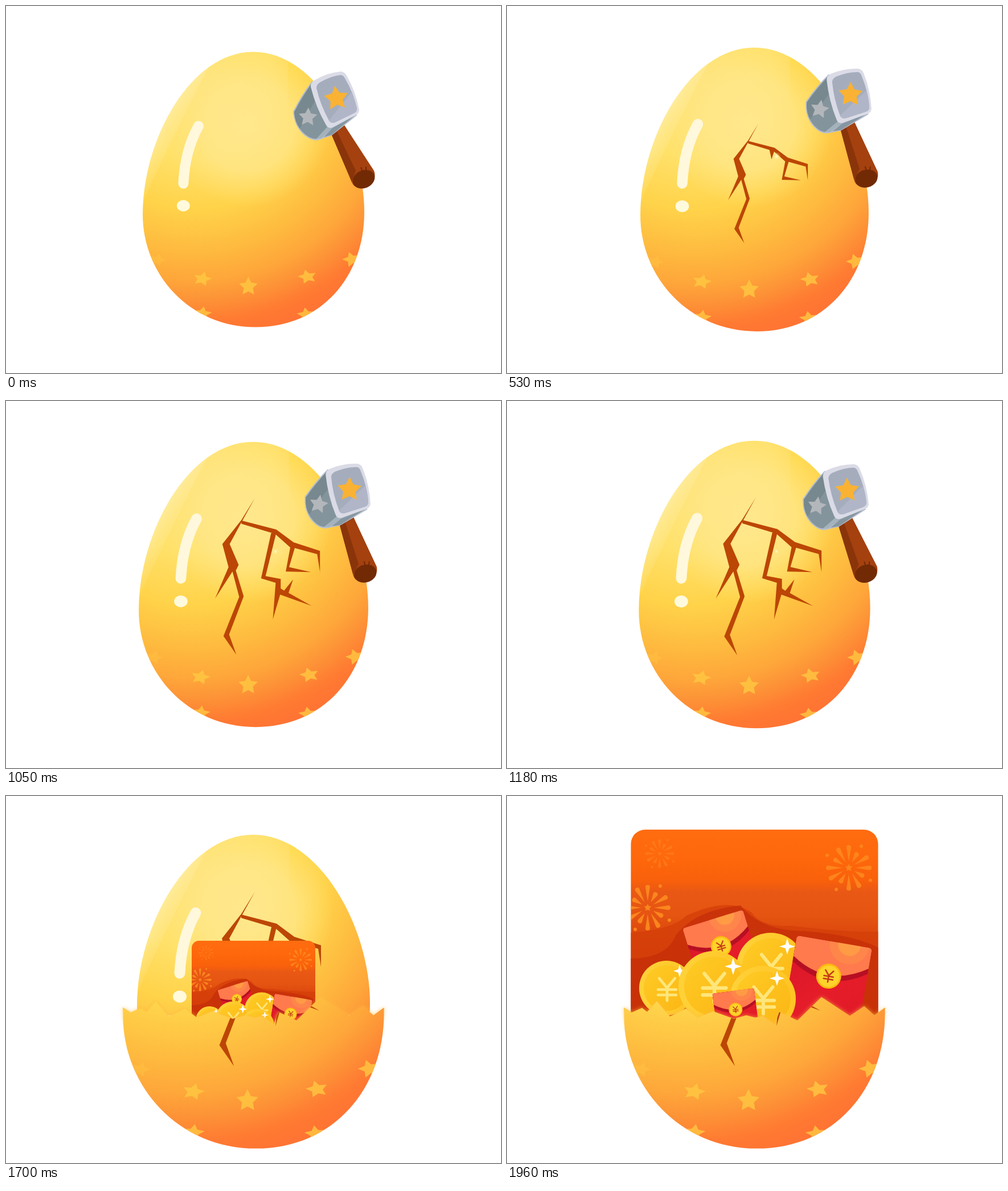
An HTML page with a canvas that plays this animation: 869x644 px, repeating every 2030 ms.

```html
<!DOCTYPE html>
<html lang="en">
<head>
<meta charset="utf-8">
<title>Golden egg</title>
<style>
html, body { margin: 0; width: 100%; height: 100%; overflow: hidden; background: #fff; }
canvas { display: block; }
</style>
</head>
<body>
<canvas id="stage" width="869" height="644"></canvas>
<script>
const ctx = document.getElementById('stage').getContext('2d');
const LOOP = 2030, MID = 434.5, TAU = Math.PI * 2;

// One entry per 130 ms step.
const hammerAngle = [0, -6, -15, -23, 8, 8, -15, -23, 8, 6, -15, -23, -23];
const eggScale = [.951, .953, .958, .971, .98, .98, .98, .982, .985, .993, 1];
const glowSize = [0, 0, 1, .6, .16, .16, .16, .6, .13, .1];

const eggPath = new Path2D('M434 68C318 68 230 230 230 368C230 480 318 576 438 576C560 576 639 482 639 364C639 230 550 68 434 68Z');
const crackPath = new Path2D(
  'M437 168L411 215L392 250L408 287L403 297L417 343L391 411L404 447L381 414L409 344L397 299L366 347L390 291L379 250L413 207Z' +
  'M413 208L475 224L506 247L553 262L553 300L548 268L508 257L498 291L537 300L492 299L500 256L473 232L413 214Z');
const forkPath = new Path2D('M466 230L448 311L474 319L469 384L482 340L538 360L497 337L505 313L489 333L483 329L483 312L456 307L475 230Z');
const stubPath = new Path2D('M463 228L468 251L475 230Z');
const shellPath = new Path2D('M205 371L219 380L237 372L246 379L263 360L286 387L314 373L335 389L362 378L398 391L420 385L436 389L450 386L470 401L478 379L510 394L552 353L602 386L627 369L645 385L664 371L680 640L190 640Z');

function group(draw) { ctx.save(); draw(); ctx.restore(); }

function fill(path, color) { ctx.fillStyle = color; ctx.fill(path); }

function scaleAt(x, y, s) { ctx.translate(x, y); ctx.scale(s, s); ctx.translate(-x, -y); }

function rotateAt(x, y, degrees) {
  ctx.translate(x, y); ctx.rotate(degrees * Math.PI / 180); ctx.translate(-x, -y);
}

function gradient(g, stops) {
  stops.forEach(([at, color]) => g.addColorStop(at, color));
  return g;
}

function radial(x, y, r, stops) { return gradient(ctx.createRadialGradient(x, y, 0, x, y, r), stops); }

function ellipse(x, y, rx, ry, color, rot = 0) {
  ctx.beginPath(); ctx.ellipse(x, y, rx, ry, rot, 0, TAU);
  ctx.fillStyle = color; ctx.fill();
}

function disc(x, y, r, color) { ellipse(x, y, r, r, color); }

function star(x, y, r, color, rot = 0, squash = 1, points = 5, inner = .5) {
  group(() => {
    ctx.translate(x, y);
    ctx.scale(1, squash);
    ctx.rotate(rot);
    ctx.beginPath();
    for (let i = 0; i < points * 2; i++) {
      const a = i * Math.PI / points, d = i % 2 ? r * inner : r;
      ctx.lineTo(d * Math.sin(a), -d * Math.cos(a));
    }
    ctx.fillStyle = color;
    ctx.fill();
  });
}

function eggSkin() {
  fill(eggPath, radial(325, 120, 475, [
    [0, '#ffe47c'], [.3, '#ffe16a'], [.5, '#ffd34a'], [.66, '#febb3f'],
    [.78, '#fea63a'], [.85, '#fd9437'], [.94, '#ff7a32'], [1, '#ff7433']]));
  group(() => {
    ctx.clip(eggPath);
    ctx.fillStyle = gradient(ctx.createLinearGradient(496, 0, 600, 60), [
      [0, 'rgba(255,218,64,.15)'], [.35, 'rgba(255,218,64,.7)'], [1, 'rgba(255,210,64,0)']]);
    ctx.fillRect(498, 60, 140, 260);
    ctx.fillStyle = radial(425, 205, 150, [
      [0, 'rgba(255,232,146,.85)'], [.55, 'rgba(255,232,142,.7)'], [1, 'rgba(255,230,130,0)']]);
    ctx.fillRect(270, 50, 310, 310);
    ctx.fillStyle = gradient(ctx.createLinearGradient(235, 210, 300, 248), [
      [0, 'rgba(255,244,196,.9)'], [.5, 'rgba(255,238,165,.45)'], [1, 'rgba(255,232,140,0)']]);
    ctx.beginPath();
    ctx.moveTo(360, 80); ctx.lineTo(220, 150); ctx.lineTo(220, 370);
    ctx.quadraticCurveTo(262, 270, 360, 80);
    ctx.fill();

    const tint = 'rgba(255,200,66,.8)';
    star(425, 501, 18, tint);
    star(340, 487, 18, tint, .25, .75);
    star(534, 483, 18, tint, -.25, .75);
    star(616, 451, 18, tint, -.3, .8);
    star(340, 551, 18, tint, .15, .75);
    star(532, 553, 18, tint, -.15, .75);
    star(257, 452, 16, 'rgba(255,200,66,.35)', .3, .75);
  });
  ctx.lineCap = 'round';
  ctx.lineWidth = 19;
  ctx.strokeStyle = '#fff8dc';
  ctx.beginPath();
  ctx.moveTo(333, 205);
  ctx.quadraticCurveTo(308, 250, 305, 311);
  ctx.stroke();
  ellipse(305, 352, 12, 10.5, '#fffadc');
}

function egg(step) {
  eggSkin();
  const color = '#bc4605';
  if (step >= 8) {
    fill(crackPath, color);
    fill(forkPath, color);
  } else if (step >= 2) {
    group(() => {
      ctx.translate(107, 76);
      ctx.scale(.765, .765);
      fill(crackPath, color);
      fill(stubPath, color);
    });
  }
}

function glow(size) {
  if (!size) return;
  const r = 46 * size;
  disc(473, 264, r, radial(473, 264, r, [
    [0, 'rgba(255,250,214,.9)'], [.35, 'rgba(255,246,190,.7)'],
    [.42, 'rgba(255,240,160,.5)'], [1, 'rgba(255,236,140,.05)']]));
}

const part = d => new Path2D(d);
const hammerParts = [
  [part('M570 222L592 206L646 289Q651 302 640 312Q624 324 612 316Q608 313 606 306Z'), '#a4410f'],
  [part('M570 222L578 214L614 289L607 309Z'), '#8a340a'],
  [part('M537 132Q520 154 504 185Q506 212 524 227Q538 238 549 235L572 227L616 192L600 150Z'), '#b6bfd0'],
  [part('M537 136Q520 157 506 186Q508 211 525 225Q536 234 545 233L565 212Z'), '#84949c'],
  [part('M536 136L506 186Q507 204 516 215L543 165Z'), '#77888f'],
  [part('M565 211L545 233L554 232L573 214Z'), '#a3b2bb'],
  [part('M573 214L558 230L572 226L611 193Z'), '#8797a1'],
  [part('M542 130Q564 117 588 115Q595 116 598 122Q614 150 620 182Q620 188 615 191L573 213Q566 216 562 209Q544 178 535 142Q534 134 542 130Z'), '#dadbe6'],
  [part('M551 134Q570 123 588 121Q593 122 595 127Q610 152 616 180Q616 186 611 188L578 204Q571 207 567 201Q552 174 545 144Q545 138 551 134Z'), '#a5adbd'],
  [part('M607 151Q614 168 616 180Q616 186 611 188L578 204Q571 207 567 201Z'), '#b0b6c8'],
];

function hammer(angle, alpha) {
  if (!alpha) return;
  group(() => {
    ctx.globalAlpha = alpha;
    rotateAt(638, 323, angle);
    hammerParts.forEach(([path, color]) => fill(path, color));
    ellipse(628, 304, 20, 15.5, '#722a05', -.42);
    ctx.strokeStyle = '#722a05';
    ctx.lineWidth = 2;
    ctx.stroke(part('M627 293L623 283M632 289L632 282'));
    star(580, 162, 22, '#f9b233', -.12, 1, 5, .52);
    star(530, 195, 17, '#b3b7bb', .05, 1, 5, .5);
  });
}

function firework(x, y, r, color) {
  group(() => {
    ctx.translate(x, y);
    star(0, 0, r * .16, color);
    ctx.fillStyle = color;
    for (let i = 0; i < 12; i++) {
      ctx.rotate(TAU / 12);
      const end = r * (i % 3 ? .93 : .72), w = r * .095;
      ctx.beginPath();
      ctx.moveTo(0, -r * .26);
      ctx.lineTo(w, -end + w);
      ctx.arc(0, -end + w, w, 0, Math.PI, true);
      ctx.fill();
      if (i % 3 === 0) disc(0, -r * 1.02, r * .07, color);
    }
  });
}

function yen(x, y, size, color, rot = 0) {
  group(() => {
    ctx.translate(x, y);
    ctx.rotate(rot);
    ctx.scale(size, size);
    ctx.lineCap = 'round';
    ctx.lineWidth = .23;
    ctx.strokeStyle = color;
    ctx.stroke(part('M-.65 -.9L0 -.1L.65 -.9M0 -.1V.95M-.75 .03H.75M-.75 .48H.75'));
  });
}

function coin(x, y, r, sparkX, sparkY, sparkR) {
  disc(x, y, r, gradient(ctx.createLinearGradient(x - r, y, x + r, y), [[0, '#ffd23a'], [1, '#ffc423']]));
  disc(x, y, r * .84, gradient(ctx.createLinearGradient(x - r, y - r, x + r, y + r), [
    [0, '#ffce28'], [.5, '#fdc01c'], [1, '#fbb414']]));
  yen(x + 1, y + 2, r * .44, '#ffe67a');
  star(sparkX, sparkY, sparkR, '#fff', 0, 1, 4, .34);
}

// The origin is the middle of the top edge.
function envelope(x, y, w, h, rot, sealR, sealY) {
  group(() => {
    ctx.translate(x, y);
    ctx.rotate(rot);
    ctx.beginPath();
    ctx.roundRect(-w / 2, 0, w, h, w * .04);
    ctx.clip();
    ctx.fillStyle = gradient(ctx.createLinearGradient(-w / 2, 0, w / 2, h), [
      [0, '#d8162a'], [.5, '#e51c29'], [1, '#df1726']]);
    ctx.fillRect(-w / 2, 0, w, h);
    const flap = (drop, color) => {
      ctx.beginPath();
      ctx.moveTo(-w / 2, 0); ctx.lineTo(w / 2, 0); ctx.lineTo(w / 2, w * .27 + drop);
      ctx.quadraticCurveTo(0, w * .61 + drop, -w / 2, w * .27 + drop);
      ctx.fillStyle = color;
      ctx.fill();
    };
    flap(w * .07, '#b60f23');
    flap(0, '#ff7a4c');
    disc(w * .2, 0, w * .26, 'rgba(255,146,74,.5)');
    disc(w * .2, 0, w * .15, 'rgba(255,166,66,.65)');
    disc(0, sealY, sealR, '#fcb90f');
    disc(0, sealY, sealR * .86, '#ffd22c');
    yen(0, sealY, sealR * .5, '#c53a16');
  });
}

function prizeCard(size) {
  if (!size) return;
  group(() => {
    scaleAt(MID, 449, size);
    ctx.beginPath();
    ctx.roundRect(217.5, 59, 434, 390, 25);
    ctx.clip();
    ctx.fillStyle = gradient(ctx.createLinearGradient(0, 59, 0, 449), [
      [0, '#ff6c10'], [.12, '#ff680c'], [.23, '#f9600b'], [.28, '#e95814'],
      [.39, '#e55411'], [.47, '#dc470d'], [.6, '#d13c0b'], [.8, '#c8310a'], [1, '#c8310a']]);
    ctx.fillRect(217, 59, 436, 392);
    fill(part('M217 240Q290 235 315 210Q390 175 430 205Q445 230 500 228Q600 240 652 238V450H217Z'), 'rgba(212,62,9,.75)');
    fill(part('M217 285Q280 285 296 245Q330 200 410 192Q440 230 500 236Q600 240 652 266V450H217Z'), 'rgba(198,46,8,.75)');
    firework(268, 101, 27, 'rgba(255,139,40,.45)');
    firework(600, 126, 43, 'rgba(255,143,32,.75)');
    firework(247, 196, 43, 'rgba(255,143,32,.85)');

    envelope(361, 216, 111, 155, -.3, 18, 50);
    coin(463, 300, 60, 492, 264, 14);
    envelope(575, 256, 134, 180, .17, 22, 61);
    coin(280, 337, 48, 303, 307, 11);
    coin(363, 334, 62, 397, 299, 15);
    coin(449, 356, 58, 474, 320, 13);
    envelope(397, 342, 74, 90, -.13, 12, 33);
  });
}

function lowerShell(size, step) {
  const grow = () => {
    ctx.translate(MID, 0);
    ctx.scale(size, size);
    ctx.translate(-MID, 0);
    ctx.translate(0, -26.5 / 1.12 * (size - 1) / .12);
  };
  group(() => {
    ctx.shadowColor = 'rgba(255,186,60,.8)';
    ctx.shadowBlur = 7;
    const mouth = new Path2D('M205 371L219 380L237 372L246 379L263 360L286 387L314 373L335 389L362 378L398 391L420 385L436 389L450 386L470 401L478 379L510 394L552 353L602 386L627 369L645 385L664 371Q660 402 652 424L216 424Q207 402 205 371Z');
    scaleAt(MID, 371, size / 1.12);
    fill(mouth, '#ffbb45');
  });
  group(() => {
    scaleAt(MID, 371, size / 1.12);
    ctx.clip(shellPath);
    scaleAt(MID, 371, 1.12 / size);
    grow();
    egg(step);
  });
}

function draw(t) {
  const step = t < 140 ? 0 : Math.floor((t - 10) / 130);
  const opened = step >= 12;
  ctx.clearRect(0, 0, 869, 644);

  group(() => {
    if (opened) {
      ctx.globalAlpha = step === 14 ? .5 : step > 14 ? 0 : 1;
      ctx.beginPath();
      ctx.rect(0, 0, 869, 385);
      ctx.clip();
    }
    if (step > 14) return;
    scaleAt(MID, 322, eggScale[step] || 1);
    egg(step);
  });
  glow(glowSize[step]);

  if (opened) {
    prizeCard(Math.min(1, (step - 11) / 4));
    lowerShell(step === 12 ? 1.06 : 1.12, step);
  }
  hammer(hammerAngle[step] || 0, step < 11 ? 1 : step === 11 ? .8 : step === 12 ? .3 : 0);
}

function tick() {
  draw(performance.now() % LOOP);
  requestAnimationFrame(tick);
}
tick();
</script>
</body>
</html>
```
